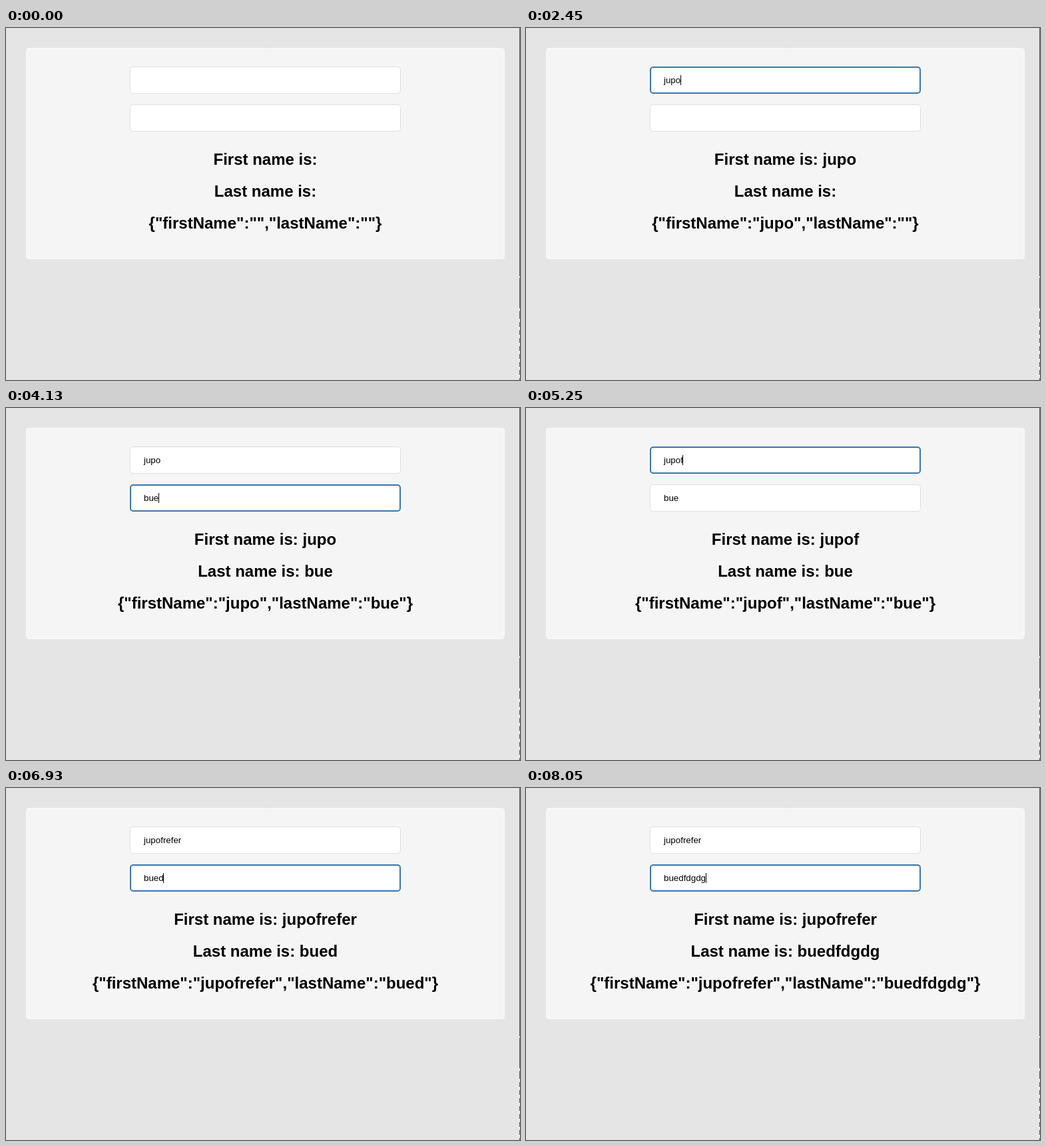
Write an HTML page with a canvas that moves like this. It is 772x530 px and loops after 8190 ms.

```html
<!DOCTYPE html>
<html lang="en">
<head>
<meta charset="utf-8">
<title>Two-way binding</title>
<style>
  html, body { margin: 0; width: 100%; height: 100%; overflow: hidden; }
  body {
    position: relative;
    background: #e5e5e5;
    color: #000;
    font-family: "Liberation Sans", Arial, sans-serif;
  }
  div, canvas { position: absolute; box-sizing: border-box; }
  canvas { left: 0; top: 0; }
  .field { left: 207px; height: 15px; font-size: 13.3333px; line-height: 15px; white-space: pre; }
  .line {
    left: 0; width: 779px; height: 48px;
    font-size: 24px; font-weight: bold; line-height: 48px;
    text-align: center; white-space: pre;
  }
</style>
</head>
<body>
<canvas id="shapes" width="772" height="530"></canvas>
<div class="field" style="top:71px"></div>
<div class="field" style="top:128px"></div>
<div class="line" style="top:174px"></div>
<div class="line" style="top:222px"></div>
<div class="line" style="top:270px"></div>
<script>
const LOOP = 8190, STEP = 70, LAST = 8050, BLINK = 560;
const FIELD_Y = [58, 115];

// Clicks and key presses: [ms, field, key]; an empty key only moves the focus.
const events = [
  [1120, 0, ''],
  [1820, 0, 'j'], [2100, 0, 'u'], [2380, 0, 'p'], [2450, 0, 'o'],
  [3290, 1, ''],
  [3430, 1, 'b'], [3710, 1, 'u'], [3990, 1, 'e'],
  [4760, 0, ''], [5180, 0, 'f'],
  [5530, 0, 'r'], [5670, 0, 'e'], [5810, 0, 'f'], [6020, 0, 'e'], [6160, 0, 'r'],
  [6720, 1, ''],
  [6930, 1, 'd'], [7070, 1, 'f'], [7210, 1, 'd'],
  [7350, 1, 'g'], [7490, 1, 'd'], [7560, 1, 'g']
];

const ctx = document.getElementById('shapes').getContext('2d');
const fields = document.querySelectorAll('.field');
const lines = document.querySelectorAll('.line');

function stateAt(t) {
  const values = ['', ''];
  let focus = -1, since = 0;
  for (const [at, field, key] of events) {
    if (at > t) break;
    values[field] += key;
    focus = field;
    since = at;
  }
  const caret = focus >= 0 && Math.floor((t - since) / BLINK) % 2 === 0;
  return { values, focus, caret };
}

// Rounded box whose border lies inside its bounds.
function box(x, y, w, h, r, fill, stroke, width) {
  const inset = width / 2;
  ctx.beginPath();
  ctx.roundRect(x + inset, y + inset, w - width, h - width, r);
  ctx.fillStyle = fill;
  ctx.fill();
  ctx.strokeStyle = stroke;
  ctx.lineWidth = width;
  ctx.stroke();
}

function drawEdge() {
  ctx.fillStyle = '#555';
  ctx.fillRect(771, 0, 1, 530);
  ctx.fillStyle = '#f2f2f2';
  ctx.fillRect(771, 374, 1, 2);
  ctx.fillRect(771, 422, 1, 4);
  for (let y = 438; y < 530; y += 12) ctx.fillRect(771, y, 1, 5);
}

function draw({ values, focus, caret }) {
  ctx.clearRect(0, 0, 772, 530);
  box(30, 30, 719, 318, 4, '#f5f5f5', '#fbfbfb', 1);
  FIELD_Y.forEach((y, i) => {
    const active = i === focus;
    box(186, y, 407, 41, 4, '#fff', active ? '#3a76b0' : '#dedede', active ? 2 : 1);
    fields[i].textContent = values[i];
  });
  if (caret) {
    const x = 207 + Math.floor(fields[focus].getBoundingClientRect().width);
    ctx.fillStyle = '#000';
    ctx.fillRect(x, FIELD_Y[focus] + 13, 1, 15);
  }
  drawEdge();

  const [firstName, lastName] = values;
  lines[0].textContent = ('First name is: ' + firstName).trim();
  lines[1].textContent = ('Last name is: ' + lastName).trim();
  lines[2].textContent = JSON.stringify({ firstName, lastName });
}

const start = performance.now();
let shown = -1;

function tick() {
  const t = (performance.now() - start) % LOOP;
  const step = Math.min(Math.floor(t / STEP) * STEP, LAST);
  if (step !== shown) {
    shown = step;
    draw(stateAt(step));
  }
  requestAnimationFrame(tick);
}
tick();
</script>
</body>
</html>
```
